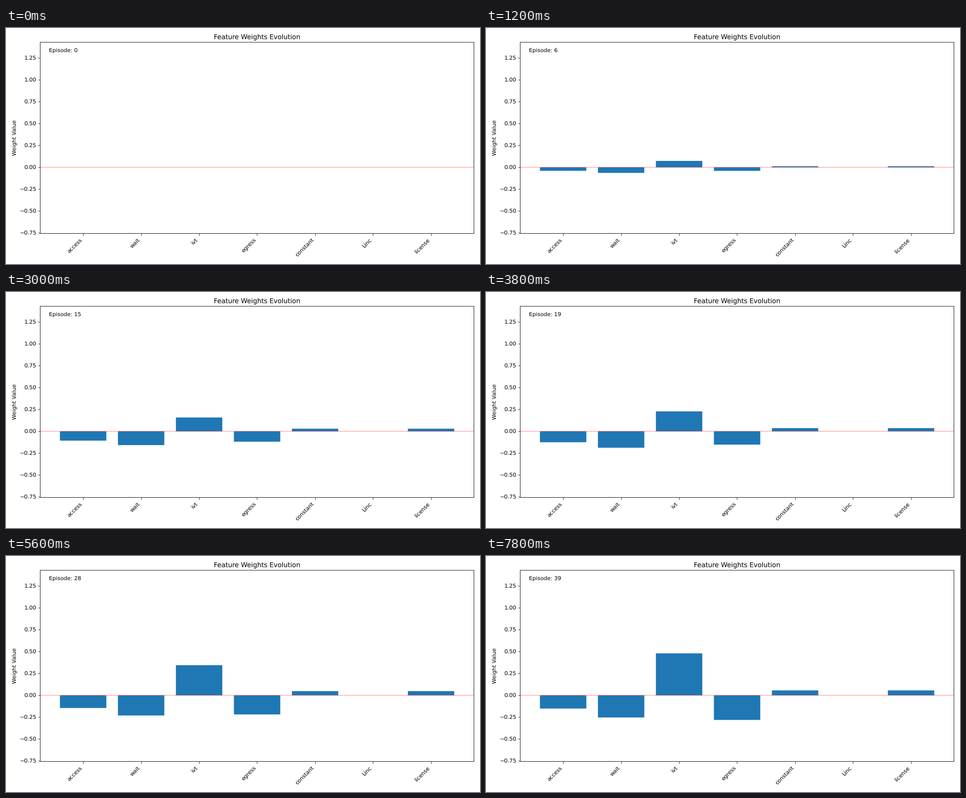
Recreate the animation shown at these times as a matplotlib script. Size 1058 by 529 pixels, loop 8 s.

```python
import numpy as np
import matplotlib.pyplot as plt
from matplotlib.animation import FuncAnimation

W, H = 1058, 529
EPISODES = 40
STEP_MS = 200


def settle(limit, span, power):
    """Weight that leaves zero and levels off at its limit."""
    return lambda t: limit * (1 - np.exp(-(t / span) ** power))


def climb(t):
    """Steady growth with a short lag around episode 14."""
    return 0.0123 * t - 0.028 * np.exp(-((t - 14) / 4) ** 2)


bias = settle(0.066, 22.7, 1.2)
FEATURES = {
    "access": settle(-0.152, 13.2, 1.5),
    "wait": settle(-0.265, 16.2, 1.3),
    "ivt": climb,
    "egress": settle(-0.4, 33.5, 1.3),
    "constant": bias,
    "Linc": lambda t: 0,
    "license": bias,
}

# Unsnapped edges let bars and lines sit between pixels.
plt.rcParams.update({"font.family": "DejaVu Sans",
                     "path.snap": False,
                     "text.hinting": "none"})

fig, ax = plt.subplots(figsize=(12, 6), dpi=W / 12)
fig.subplots_adjust(left=76.4 / W, right=1044.5 / W,
                    bottom=1 - 460.5 / H, top=1 - 32 / H)

slots = range(len(FEATURES))
bars = ax.bar(slots, [0] * len(FEATURES), color="#1f77b4")
ax.axhline(0, color="r", alpha=0.3)
ax.set_xlim(-0.74, 6.74)
ax.set_ylim(-0.7566, 1.4306)
ax.set_xticks(slots, FEATURES, rotation=45, ha="right")
ax.set_ylabel("Weight Value")
ax.set_title("Feature Weights Evolution")
counter = ax.text(0.02, 0.95, "", transform=ax.transAxes)


def update(episode):
    for bar, weight in zip(bars, FEATURES.values()):
        bar.set_height(weight(episode) if episode else 0)
    counter.set_text(f"Episode: {episode}")
    return [*bars, counter]


anim = FuncAnimation(fig, update, frames=EPISODES, interval=STEP_MS,
                     repeat=True, repeat_delay=0, blit=False)
plt.show()
```
